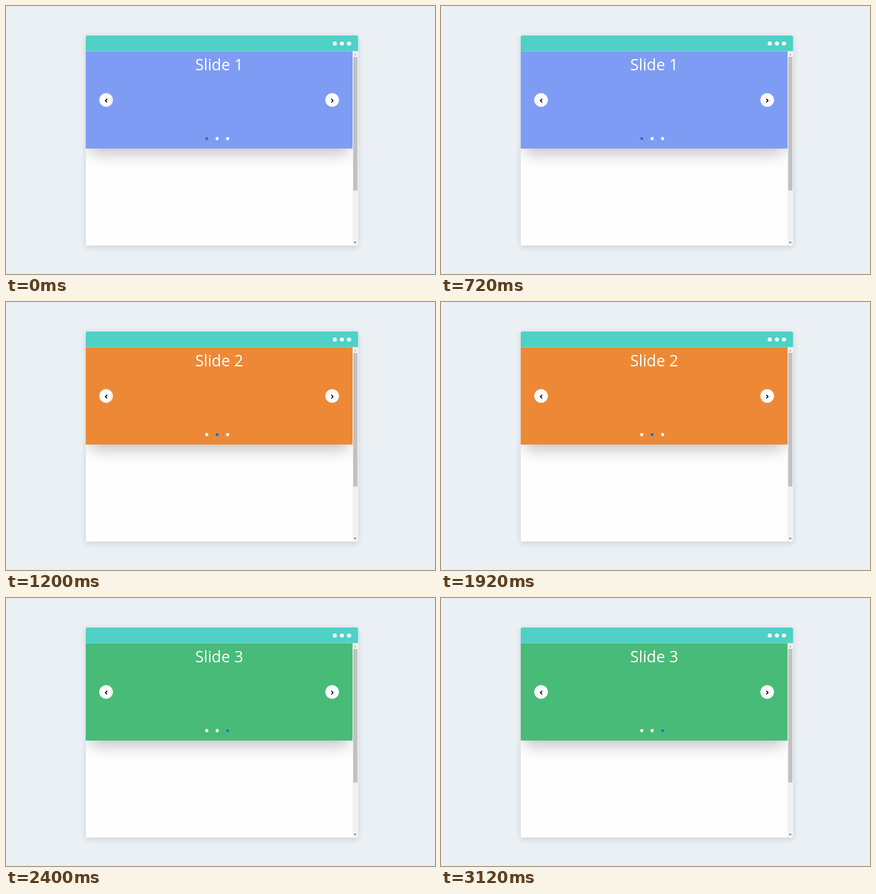
Recreate the animation shown at these times as an HTML page. Size 640 by 400 pixels, loop 3.6 s.

```html
<!DOCTYPE html>
<html lang="en">
<head>
<meta charset="utf-8">
<title>Slider</title>
<style>
  html, body { margin: 0; width: 100%; height: 100%; overflow: hidden; background: #ebf0f5; }
  svg { display: block; width: 640px; height: 400px; }
  .slide { opacity: 0; animation: show 3.6s step-end infinite; }
  .second { animation-delay: -2.4s; }
  .third { animation-delay: -1.2s; }
  @keyframes show {
    0% { opacity: 1; }
    33.3333%, 100% { opacity: 0; }
  }
  text { font: 23.4px "Open Sans", "Noto Sans", sans-serif; fill: #fff; text-anchor: middle; }
  .active { fill: #2b6cb0; }
  .chevron { fill: none; stroke: #000; stroke-width: 1.5; }
</style>
</head>
<body>
<svg viewBox="0 0 640 400">
  <defs>
    <filter id="soft" x="-20%" y="-20%" width="140%" height="140%">
      <feGaussianBlur stdDeviation="4"/>
    </filter>
    <filter id="deep" x="-20%" y="-40%" width="140%" height="180%">
      <feGaussianBlur stdDeviation="12"/>
    </filter>
    <clipPath id="view"><rect x="119" y="67.6" width="398" height="290"/></clipPath>
    <clipPath id="frame"><rect x="119" y="44" width="406.3" height="313.5" rx="2"/></clipPath>
    <rect id="panel" x="119" y="67.6" width="398" height="145.2"/>
    <circle id="dot" cy="198" r="2.4"/>
    <g id="dots" fill="#fff">
      <use href="#dot" x="299.5"/>
      <use href="#dot" x="315"/>
      <use href="#dot" x="330.6"/>
    </g>
  </defs>

  <rect x="119" y="46" width="406.3" height="314" rx="2" opacity=".14" filter="url(#soft)"/>
  <g clip-path="url(#frame)">
    <rect x="119" y="44" width="407" height="314" fill="#fefefe"/>
    <rect x="119" y="44" width="407" height="23.6" fill="#4fd1c5"/>
    <g fill="#fff">
      <circle cx="490.5" cy="56" r="3.1"/>
      <circle cx="501.1" cy="56" r="3.1"/>
      <circle cx="511.7" cy="56" r="3.1"/>
    </g>

    <g clip-path="url(#view)">
      <rect x="125" y="86" width="386" height="133.5" opacity=".25" filter="url(#deep)"/>
    </g>

    <rect x="517" y="67.6" width="9" height="290" fill="#f1f1f1"/>
    <rect x="518" y="76" width="6.3" height="199.4" fill="#c1c1c1"/>
    <path d="M519 73.2l2-2 2 2z" fill="#a3a3a3"/>
    <path d="M519 352l2 2 2-2z" fill="#505050"/>
  </g>

  <g class="slide">
    <use href="#panel" fill="#7f9cf5"/>
    <text x="318" y="96">Slide 1</text>
    <use href="#dots"/>
    <use href="#dot" x="299.5" class="active"/>
  </g>
  <g class="slide second">
    <use href="#panel" fill="#ed8936"/>
    <text x="318" y="96">Slide 2</text>
    <use href="#dots"/>
    <use href="#dot" x="315" class="active"/>
  </g>
  <g class="slide third">
    <use href="#panel" fill="#48bb78"/>
    <text x="318" y="96">Slide 3</text>
    <use href="#dots"/>
    <use href="#dot" x="330.6" class="active"/>
  </g>

  <circle cx="149.3" cy="140.3" r="10.3" fill="#fff"/>
  <circle cx="486.6" cy="140.3" r="10.3" fill="#fff"/>
  <path class="chevron" d="M150.8 138.6l-2.4 2.6 2.4 2.6M485.4 138.6l2.4 2.6-2.4 2.6"/>
</svg>
</body>
</html>
```
